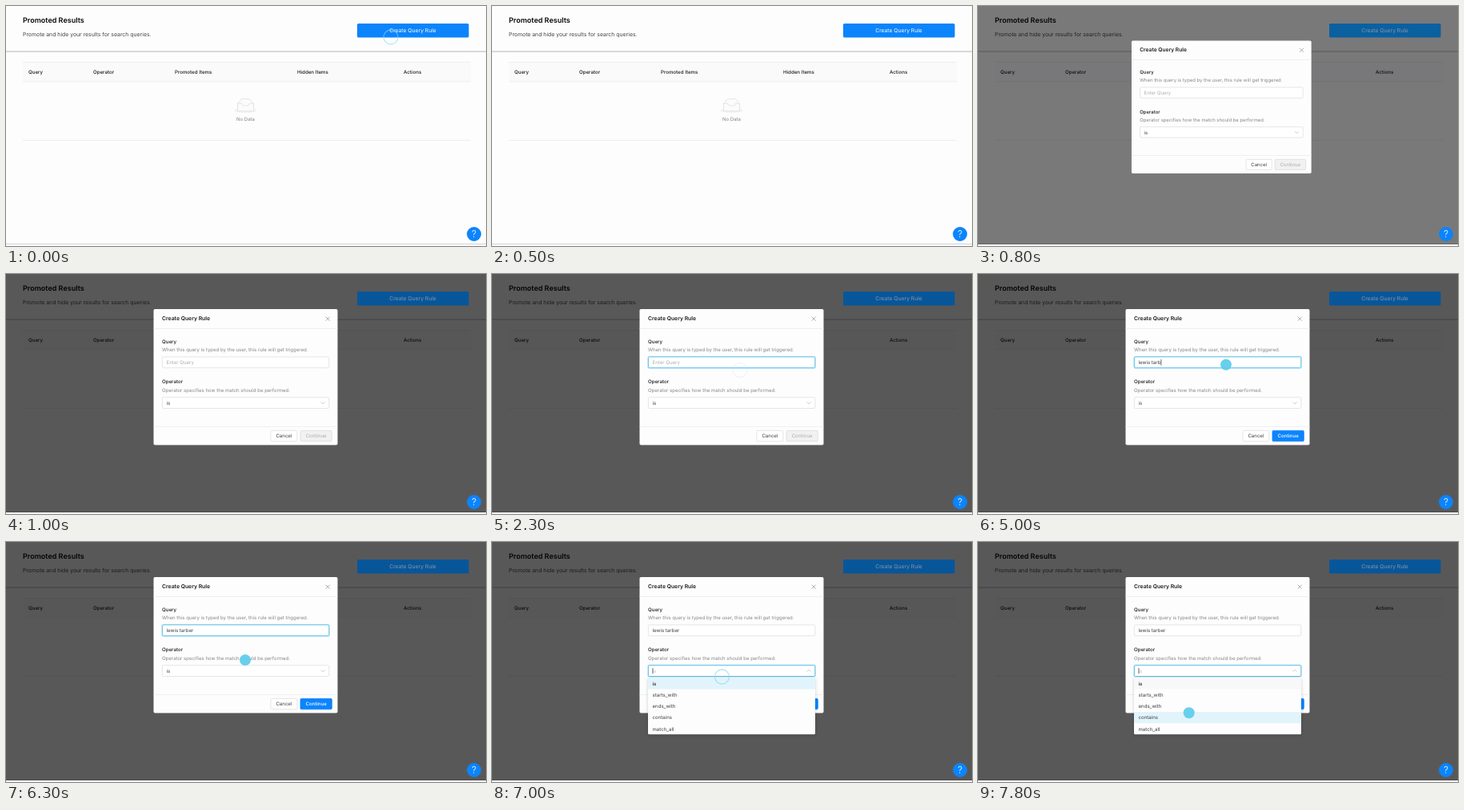
These frames come from a looping animation (600 px wide and 301 px high, 8 s). An HTML page:

```html
<!DOCTYPE html>
<html lang="en">
<head>
<meta charset="utf-8">
<title>Promoted Results</title>
<style>
  html, body { margin: 0; width: 100%; height: 100%; overflow: hidden; background: #fdfdfe; }
  svg { display: block; width: 100vw; height: 100vh; }
  text {
    font: 6.1px Inter, "Open Sans", sans-serif;
    fill: #3c3c3e;
    text-rendering: geometricPrecision;
    white-space: pre;
  }
  .mid { text-anchor: middle; }
  .th { font-size: 6.15px; font-weight: 500; fill: #1c1c1e; }
  .label { font-size: 6.15px; font-weight: 500; fill: #1c1c1e; }
  .hint { font-size: 6.05px; fill: #858587; }
  .white { fill: #fff; }
  .blue { fill: #0b84fc; }
  .rule { fill: #ebebed; }
  .box { fill: #fff; stroke: #dfdfe1; stroke-width: .8; }
  .icon { fill: none; stroke: #8a8a8c; stroke-width: .7; }
  .chevron { stroke: #b9b9bb; }
  .glow { fill: none; stroke: #cdedf8; stroke-width: 2.4; visibility: hidden; }

  #mask, #modal, #menu, #caret, #pick, .up { visibility: hidden; }
  .open #mask, .open #modal, .zoom #mask, .zoom #modal { visibility: visible; }
  .zoom #modal { transform: matrix(.977, 0, 0, .977, 11.7, .5); }
  .zoom #mask { opacity: .52; }
  .zoom #create { fill: #0b60a0; }
  .open #create { fill: #08569a; }
  .zoom #createText, .open #createText { fill: #8795a6; }

  .hoverQuery #query, .focusQuery #query,
  .hoverOp #operator, .focusOp #operator { stroke: #42b3e0; }
  .focusQuery #queryGlow, .focusOp #opGlow { visibility: visible; }
  .focusQuery #caret, .focusOp #pick, .focusOp .up { visibility: visible; }
  .blink #caret { visibility: hidden; }
  .focusOp .down { visibility: hidden; }
  .focusOp #value { fill: #bdbdbf; }

  #go { fill: #f1f1f2; stroke: #dcdcde; stroke-width: .8; }
  #goText { fill: #adadaf; }
  .ready #go { fill: #0b84fc; stroke: #0b84fc; }
  .ready #goText { fill: #fff; font-weight: 500; }

  #menu { transform-origin: 300px 170px; filter: drop-shadow(0 1px 2px rgba(0, 0, 0, .18)); }
  .drop #menu, .dropping #menu { visibility: visible; }
  .dropping #menu { transform: scaleY(.9); opacity: .65; }
  #dot { fill: #5fcdeb; opacity: .95; }
  #ring { fill: none; stroke: #8fd8ee; stroke-width: 1.3; }
</style>
</head>
<body>
<svg id="stage" viewBox="0 0 600 301">
  <defs>
    <linearGradient id="shade" x2="0" y2="1">
      <stop offset="0" stop-color="#b9b9bc"/>
      <stop offset="1" stop-color="#fdfdfe"/>
    </linearGradient>
  </defs>

  <rect width="600" height="301" fill="#fdfdfe"/>
  <rect y="56.5" width="600" height="2.2" fill="url(#shade)"/>
  <text x="21" y="20.6" style="font-size:9.02px;font-weight:600;fill:#080809">Promoted Results</text>
  <text x="21" y="38" style="font-size:6.88px;fill:#444446">Promote and hide your results for search queries.</text>

  <rect x="21" y="70" width="560" height="25" fill="#fafafb"/>
  <rect class="rule" x="21" y="70" width="560" height=".7"/>
  <rect class="rule" x="21" y="94.5" width="560" height=".8"/>
  <text class="th" x="28" y="85">Query</text>
  <text class="th" x="109" y="85">Operator</text>
  <text class="th" x="211" y="85">Promoted Items</text>
  <text class="th" x="364" y="85">Hidden Items</text>
  <text class="th" x="497" y="85">Actions</text>

  <ellipse cx="299.5" cy="131" rx="14" ry="3" fill="#f2f2f3"/>
  <g fill="#fbfbfc" stroke="#d3d3d6" stroke-width=".6">
    <path d="M289.5 122.3l4.6-5.2q.4-.5 1-.5h9q.6 0 1 .5l4.4 5.2"/>
    <path d="M289.5 122.3h4.8q1 0 1 1.3t1 1.3h6.4q1 0 1-1.3t1-1.3h4.8v8q0 1.5-1.3 1.5h-17.4q-1.3 0-1.3-1.5z"/>
  </g>
  <text class="mid" x="299.5" y="144.3" style="font-size:6px;fill:#838385">No Data</text>
  <rect class="rule" x="21" y="168" width="560" height=".8"/>
  <rect y="298" width="600" height="1" fill="#d2d2d4"/>

  <rect id="mask" width="600" height="299" fill="#030103" opacity=".65"/>
  <rect id="create" class="blue" x="439" y="22" width="139.5" height="17.5" rx="1.6"/>
  <text id="createText" class="mid white" x="508.5" y="33.2" style="font-size:6.78px">Create Query Rule</text>
  <circle class="blue" cx="585" cy="286" r="9"/>
  <text class="mid white" x="585" y="290.3" style="font-size:12px;font-weight:300">?</text>

  <g id="modal">
    <rect x="184.5" y="44" width="230" height="170.5" rx="1.8" fill="#fefdfe"/>
    <text x="195" y="58.3" style="font-size:6.82px;font-weight:600;fill:#1c1c1e">Create Query Rule</text>
    <path class="icon" d="M399.7 53.7l5 5m0-5l-5 5"/>
    <rect class="rule" x="184.5" y="68" width="230" height=".8"/>

    <text class="label" x="195" y="86.5">Query</text>
    <text class="hint" x="195" y="96.9">When this query is typed by the user, this rule will get triggered.</text>
    <rect id="queryGlow" class="glow" x="195.4" y="103.9" width="208.4" height="13.8" rx="1.4"/>
    <rect id="query" class="box" x="195.4" y="103.9" width="208.4" height="13.8" rx="1.4"/>
    <text id="ghost" x="200.5" y="113" style="fill:#adadaf">Enter Query</text>
    <text id="typed" x="200.5" y="113"></text>
    <rect id="caret" y="107" width=".7" height="7.6" fill="#333"/>

    <text class="label" x="195" y="137.2">Operator</text>
    <text class="hint" x="195" y="147.8">Operator specifies how the match should be performed.</text>
    <rect id="opGlow" class="glow" x="195.4" y="154.7" width="208.4" height="13.8" rx="1.4"/>
    <rect id="operator" class="box" x="195.4" y="154.7" width="208.4" height="13.8" rx="1.4"/>
    <text id="value" x="200.5" y="164">is</text>
    <rect id="pick" x="200.6" y="158" width=".7" height="7.4" fill="#333"/>
    <path class="icon chevron down" d="M393.7 160.5l2.4 2.5 2.4-2.5"/>
    <path class="icon chevron up" d="M393.7 162.7l2.4-2.5 2.4 2.5"/>

    <rect class="rule" x="184.5" y="191" width="230" height=".8"/>
    <rect class="box" x="330.9" y="196.4" width="33" height="13.4" rx="1.3"/>
    <text class="mid" x="347.4" y="205.3">Cancel</text>
    <rect id="go" x="368" y="196.4" width="39.3" height="13.4" rx="1.3"/>
    <text id="goText" class="mid" x="387.6" y="205.3">Continue</text>
  </g>

  <g id="menu">
    <rect x="195" y="170" width="209" height="71.2" rx="1.5" fill="#fefdfe"/>
    <rect x="195" y="170.4" width="209" height="14.2" fill="#f8f8f9"/>
    <rect id="hover" x="195" width="209" height="14.2" fill="#e2f4fb"/>
  </g>

  <circle id="ring" r="9"/>
  <circle id="dot" r="7"/>
</svg>
<script>
const LOOP = 8000;
const PHRASE = "lewis tarber";
const ROW = 14.2;
const $ = id => document.getElementById(id);

["is", "starts_with", "ends_with", "contains", "match_all"].forEach((name, i) => {
  const el = document.createElementNS("http://www.w3.org/2000/svg", "text");
  el.textContent = name;
  el.setAttribute("x", 200.5);
  el.setAttribute("y", 179.7 + ROW * i);
  if (!i) el.style.fontWeight = 600;
  $("menu").append(el);
});

// Each step changes only what it names; the rest carries over.
const changes = [
  [0, { ui: "", chars: 0, row: 0, dot: null, ring: [481, 39, .6] }],
  [300, { ring: null }],
  [800, { ui: "zoom" }],
  [1000, { ui: "open" }],
  [1300, { dot: [428, 64] }],
  [1500, { dot: [312, 117], ui: "open hoverQuery" }],
  [1800, { dot: [310, 120] }],
  [2000, { dot: null, ring: [310, 120.7, .7], ui: "open focusQuery blink" }],
  [2300, { ring: [310, 120.7, .2] }],
  [2500, { ring: null, dot: [310, 113.7], chars: 1, ui: "open focusQuery ready" }],
  [2800, { chars: 2 }],
  [3000, { chars: 4 }],
  [3300, { chars: 5 }],
  [3500, { chars: 6 }],
  [3800, { chars: 7 }],
  [4300, { chars: 8 }],
  [4800, { chars: 9 }],
  [5000, { chars: 10 }],
  [5300, { chars: 11 }],
  [5500, { chars: 12 }],
  [6000, { dot: [309, 128.5], ui: "open focusQuery blink ready" }],
  [6300, { dot: [299, 148] }],
  [6500, { dot: [289, 162.5], ui: "open focusQuery blink hoverOp ready" }],
  [6800, { dot: null, ring: [287.5, 169, .9], ui: "open focusOp dropping ready" }],
  [7000, { ring: [287.5, 169, .7], ui: "open focusOp drop ready" }],
  [7300, { ring: null, dot: [279, 189], row: 1 }],
  [7500, { dot: [268, 206], row: 2 }],
  [7800, { dot: [263.7, 214.2], row: 3 }]
];
let last = {};
const steps = changes.map(([at, change]) => ({ at, ...(last = { ...last, ...change }) }));

function place(el, spot) {
  el.style.visibility = spot ? "visible" : "hidden";
  if (!spot) return;
  el.setAttribute("cx", spot[0]);
  el.setAttribute("cy", spot[1]);
  if (spot[2]) el.style.opacity = spot[2];
}

function draw(s) {
  $("stage").setAttribute("class", s.ui);
  $("typed").textContent = PHRASE.slice(0, s.chars);
  $("ghost").style.display = s.chars ? "none" : "";
  $("caret").setAttribute("x", 200.7 + $("typed").getComputedTextLength());
  $("hover").setAttribute("y", 170.4 + ROW * s.row);
  place($("dot"), s.dot);
  place($("ring"), s.ring);
}

const start = performance.now();
let shown;
function tick() {
  const t = (performance.now() - start) % LOOP;
  const now = steps.findLast(s => s.at <= t);
  if (now !== shown) draw(shown = now);
  requestAnimationFrame(tick);
}
tick();
</script>
</body>
</html>
```
